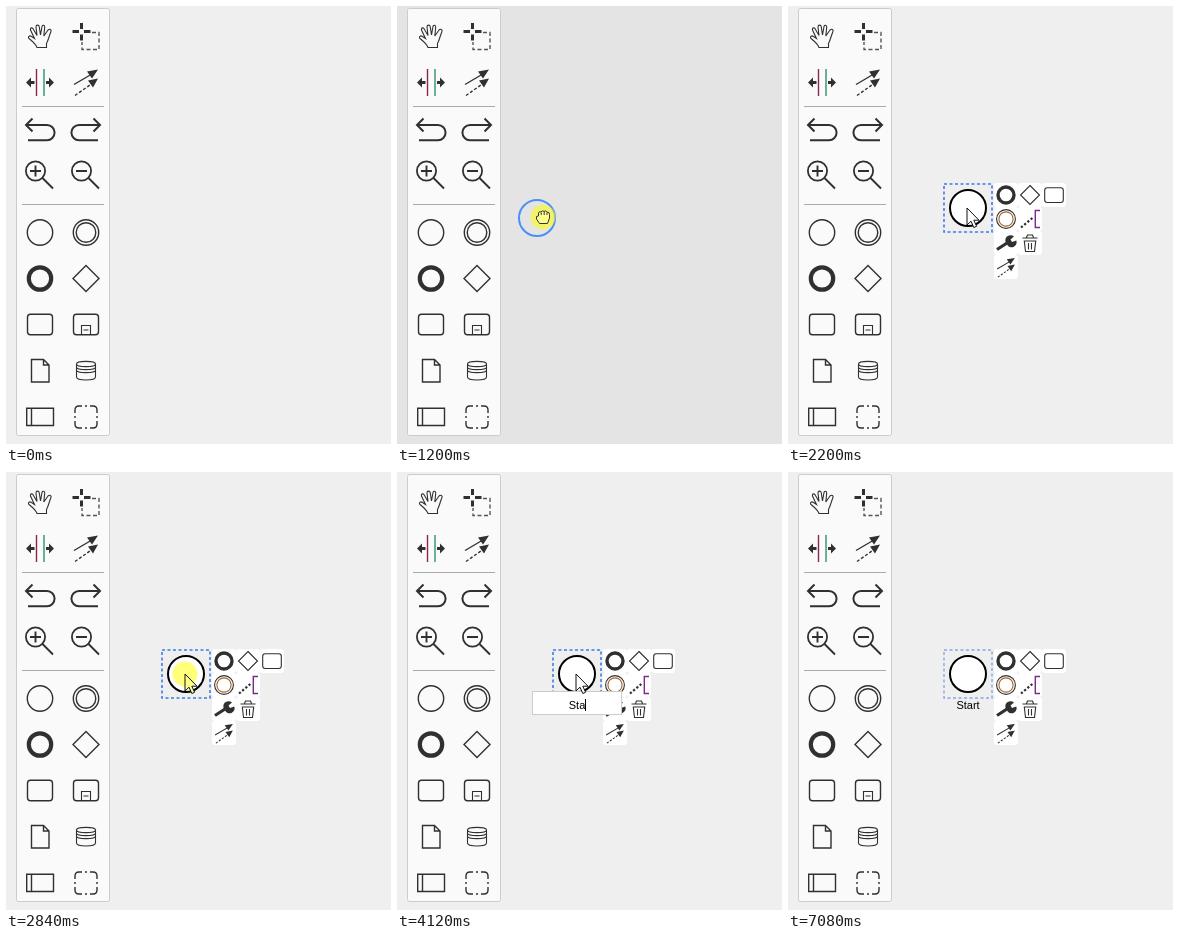
Recreate the animation shown at these times as an HTML page. Size 385 by 438 pixels, loop 7760 ms.

```html
<!DOCTYPE html>
<html lang="en">
<head>
<meta charset="utf-8">
<style>
  html, body { margin: 0; width: 100%; height: 100%; overflow: hidden; background: #efefef; }
  svg { display: block; }
  .icon { fill: none; stroke: #303030; stroke-width: 1.4; }
  .solid { fill: #303030; stroke: none; }
  .thin { stroke-width: 1.1; }
  .hover { stroke: #ff7400; }
  text { font: 11px "Liberation Sans", Arial, sans-serif; text-anchor: middle; }
</style>
</head>
<body>
<svg width="385" height="438" viewBox="0 0 385 438">
  <defs>
    <g id="connect" class="icon">
      <path d="M-12 2L5-8"/>
      <path class="solid" d="M12-13L6-4 1-11ZM12-4L7 5 2-2Z"/>
      <path d="M-11 13L6 1" stroke-dasharray="3 2"/>
    </g>
    <g id="zoom" class="icon" stroke-width="1.8">
      <circle cx="-4.5" cy="-4" r="9.6" stroke-width="1.8"/>
      <path d="M2.5 3L13 13.5M-10-4H1" stroke-width="1.9"/>
    </g>
    <path id="undo" class="icon" style="stroke-width:2" d="M26.5 112.5L20 119l6.5 6.5M20 119H41a7.6 7.6 0 0 1 0 15.2H22"/>
    <rect id="task" class="icon" x="-12.5" y="-10.3" width="25" height="20.6" rx="3"/>
    <path id="arrow" d="M0 0V17L4 13.2 6.8 19.5 9.6 18.3 6.8 12.2H12Z" stroke="#111"/>
  </defs>

  <rect id="canvas" width="385" height="438"/>

  <g id="shape">
    <circle cx="180" cy="202" r="18" fill="#fff" stroke="#000" stroke-width="2"/>
    <rect id="outline" x="156" y="178" width="48" height="48" fill="none" stroke-dasharray="3 2.5"/>
  </g>
  <text id="label" x="180" y="237">Start</text>
  <circle id="ghost" r="18" fill="none" stroke="#4a90f8" stroke-width="2"/>

  <g id="pad">
    <g id="entries" fill="#fff"></g>
    <g class="icon">
      <circle cx="218" cy="189" r="8" stroke-width="3.4"/>
      <path d="M242 179.5l9.5 9.5-9.5 9.5-9.5-9.5Z" class="thin"/>
      <rect x="256.7" y="181.7" width="18.6" height="14.8" rx="2.5" class="thin"/>
      <circle cx="218" cy="213" r="9.4" class="thin"/>
      <circle cx="218" cy="213" r="7.1" class="thin" stroke="#a5652c"/>
      <path d="M233 221.5L245 211.5" stroke-width="2.2" stroke-dasharray="2.2 2"/>
      <path d="M252 204.5H247.3V221.5H252" stroke="#7a2a8c"/>
      <path d="M209 243.5L219 237" stroke-width="3.2"/>
      <path class="solid" d="M226 230.5L222.5 233.5 224 236 228.3 234.5A5 5 0 0 1 219 238.2 5 5 0 0 1 226 230.5Z"/>
      <path d="M234.5 232H249.5M238.5 231.5L239.5 229H244.5L245.5 231.5M236.3 235L237.5 245.5H246.5L247.7 235ZM240.5 237V243.5M243.5 237V243.5" class="thin"/>
    </g>
    <use href="#connect" transform="translate(218 261.5) scale(.74)"/>
  </g>

  <g id="editor">
    <rect id="field" x="135.5" y="219.5" width="89" fill="#fff" stroke="#ccc"/>
    <text id="typed" x="180" y="237"></text>
    <rect id="caret" width="1" height="12"/>
  </g>

  <g id="palette">
    <rect x="10.5" y="2.5" width="93" height="427" rx="2" fill="#fafafa" stroke="#ccc"/>
    <path d="M16 100.5H98M16 198.5H98" stroke="#aaa"/>
    <g class="icon">
      <path class="thin" d="M31 41.5C30 38 26 35 23 32.5C21.5 31 23.5 29 25.5 30.5L28.5 32.5 24.5 24C24 21.5 26.5 21 27.5 23.5L31 29.5 30 21C30 18.5 33 18.5 33.3 21L34.5 29 36 20.5C36.5 18.5 39 19 38.7 21.5L37.8 30 42 24C43.5 22.5 46 23.5 44.8 26C43 30 42.5 34 40.5 37.5V41.5Z"/>
      <path d="M66.5 25.5H73M78 25.5H84.5M75.5 17V23M75.5 28.5V34.5" stroke-width="3"/>
      <path d="M86 26.5H93V43.5H76V36" stroke="#555" stroke-dasharray="4 2.5"/>
      <path d="M30.5 63V90" stroke="#8c2454"/>
      <path d="M38 63V90" stroke="#2f9070"/>
      <path class="solid" d="M20 76.5L25 71.5V75H28.5V78H25V81.5ZM48 76.5L43 71.5V75H40V78H43V81.5Z"/>
      <path d="M29.5 159.5V170.5" stroke-width="1.9"/>
      <circle id="startIcon" cx="34" cy="226.5" r="12.7"/>
      <circle cx="80" cy="226.5" r="12.7"/>
      <circle cx="80" cy="226.5" r="9.8"/>
      <circle cx="34" cy="272.5" r="11.2" stroke-width="4.2"/>
      <path d="M80 259.5l13 13-13 13-13-13Z"/>
      <path class="thin" d="M75.5 328V319.5H84.5V328M77.5 324H82.5"/>
      <path d="M25.5 353.5H37.5L43 359V376H25.5ZM37.5 353.5V359H43"/>
      <path class="thin" d="M70.5 358V371C70.5 375 89.5 375 89.5 371V358C89.5 354.5 70.5 354.5 70.5 358C70.5 361.5 89.5 361.5 89.5 358M70.5 361C70.5 364.5 89.5 364.5 89.5 361M70.5 364C70.5 367.5 89.5 367.5 89.5 364"/>
      <path d="M20.7 402.3H47.5V419.5H20.7ZM25.5 402.3V419.5"/>
      <path d="M69 407V404Q69 400 73 400H76M84 400H87Q91 400 91 404V407M91 415V418Q91 422 87 422H84M76 422H73Q69 422 69 418V415M79 400H81M79 422H81M69 410V412M91 410V412"/>
    </g>
    <use href="#connect" x="80" y="76.5"/>
    <use href="#undo"/>
    <use href="#undo" transform="translate(114) scale(-1 1)"/>
    <use href="#zoom" x="34" y="169"/>
    <use href="#zoom" x="80" y="169"/>
    <use href="#task" x="34" y="318.5"/>
    <use href="#task" x="80" y="318.5"/>
  </g>

  <g id="pointer">
    <circle id="halo" r="12.5" fill="#ff0" fill-opacity=".52"/>
    <use id="arrowCursor" href="#arrow"/>
    <path id="fist" fill="#ffff8c" stroke="#333" d="M-3.5 6.5L-6.5 2Q-7.5-1.5-4.5-1V-4Q-4-6-2-5Q-1-7 1-5.6Q3-7 4-4.8Q6.5-5.5 6.5-2.5V1L4.5 6.5ZM-1.8-4.5V-2M1.2-5V-2M4-4.5V-2"/>
  </g>
</svg>
<script>
  const LOOP = 7760, TICK = 40;
  const path = [
    [400, 0, 291], [680, 29, 230], [920, 29, 230], [1040, 60, 226],
    [1200, 146, 211], [1320, 170, 206], [1520, 179, 202]
  ];
  const keyTimes = [3720, 4000, 4120, 4320, 4400];
  const $ = id => document.getElementById(id);
  const set = (id, attrs) => {
    for (const name in attrs) $(id).setAttribute(name, attrs[name]);
  };
  const show = (id, on) => set(id, { visibility: on ? 'inherit' : 'hidden' });
  const within = (t, from, to) => t >= from && t < to;

  [3, 2, 2, 1].forEach((count, row) => {
    for (let col = 0; col < count; col++) {
      $('entries').innerHTML +=
        `<rect x="${206 + col * 24}" y="${177 + row * 24}" width="24" height="24" rx="3"/>`;
    }
  });

  function pointerAt(t) {
    if (t >= 7000) return [286, 327];
    const i = path.findIndex(p => p[0] > t);
    if (i < 0) return path[path.length - 1].slice(1);
    if (i === 0) return [-40, 291];
    const [t0, x0, y0] = path[i - 1], [t1, x1, y1] = path[i];
    const k = (t - t0) / (t1 - t0);
    return [x0 + (x1 - x0) * k, y0 + (y1 - y0) * k];
  }

  function render(t) {
    const [x, y] = pointerAt(t);
    const dragging = within(t, 960, 2200);
    const pressed = within(t, 920, 2200) || within(t, 2800, 2880) || within(t, 2920, 3080);
    const editing = within(t, 3080, 5680);
    const placed = t >= 2200;

    set('canvas', { fill: dragging && x > 104 ? '#e4e4e4' : '#efefef' });
    set('startIcon', { class: x > 11 && x < 57 && within(y, 213, 249) ? 'hover' : '' });

    show('pointer', within(t, 400, 7080));
    set('pointer', { transform: `translate(${x} ${y})` });
    show('halo', pressed);
    show('fist', dragging);
    show('arrowCursor', !dragging);
    set('arrowCursor', { fill: pressed ? '#ffff8c' : '#fff' });

    // The dragged outline snaps to a 10px grid.
    show('ghost', dragging);
    set('ghost', {
      cx: Math.round((x - 2) / 10) * 10,
      cy: Math.round((y - 2) / 10) * 10 + 2
    });

    show('shape', placed);
    set('outline', t < 7000
      ? { stroke: '#3f7ce8', 'stroke-width': 1.6 }
      : { stroke: '#85a8ee', 'stroke-width': 1.4 });
    show('pad', placed && !within(t, 2880, 3080));
    show('label', t >= 5680);

    const count = keyTimes.filter(k => k <= t).length;
    show('editor', editing);
    set('field', { height: count ? 23 : 21 });
    $('typed').textContent = 'Start'.slice(0, count);
    const half = count ? $('typed').getComputedTextLength() / 2 : 0;
    set('caret', { x: Math.floor(180 + half), y: count ? 227 : 228 });
    show('caret', !within(t, 3600, 3720) && !within(t, 4920, 5480));
  }

  const begin = performance.now();
  function loop() {
    const t = (performance.now() - begin) % LOOP;
    render(Math.floor(t / TICK) * TICK);
    requestAnimationFrame(loop);
  }
  loop();
</script>
</body>
</html>
```
